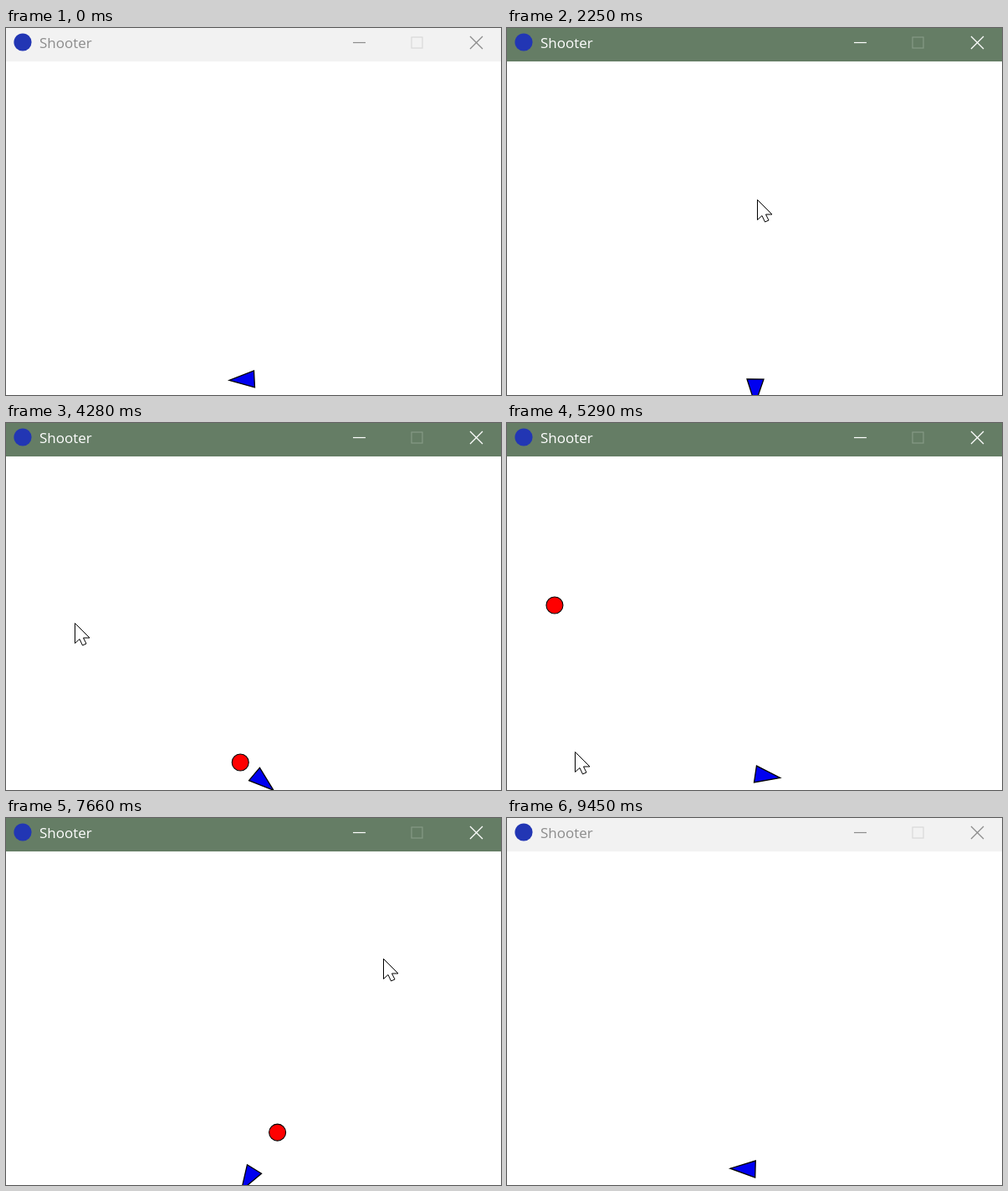
Animation, 592 px wide and 439 px high, one loop 9580 ms. Source, as an HTML page with a canvas:

```html
<!DOCTYPE html>
<html lang="en">
<head>
<meta charset="utf-8">
<title>Shooter</title>
<style>
  html, body { margin: 0; width: 100%; height: 100%; overflow: hidden; background: #fff; }
  canvas { display: block; }
</style>
</head>
<body>
<canvas id="stage" width="592" height="439"></canvas>
<script>
const ctx = document.getElementById('stage').getContext('2d');
const LOOP = 9580, STEP = 68, LAG = 30, SPEED = 0.289, SHOT_DELAY = 40;
const FOCUS_LOST = 9450;
const ship = { x: 297, y: 420 };
const entry = { x: 600, y: 405 };

// The screen refreshes every STEP ms, counted anew from each of these times.
const resyncs = [0, 3080, 4280, 5290, 6700, 7520, 8480, FOCUS_LOST];

// The pointer rests between eased moves; `via` bends a move.
const moves = [
  { start: 0, duration: 640, to: { x: 440, y: 287 } },
  { start: 1100, duration: 390, to: { x: 299, y: 205 } },
  { start: 2360, duration: 1100, to: { x: 82, y: 239 }, via: { x: 150, y: 164 } },
  { start: 4600, duration: 830, to: { x: 81, y: 406 } },
  { start: 6220, duration: 1075, to: { x: 451, y: 168 }, via: { x: 130, y: 166 } },
  { start: 7866, duration: 1000, to: { x: 556, y: 411 }, via: { x: 520, y: 240 } },
  { start: 9380, duration: 30, to: { x: 600, y: 428 } }
];

// Every shot leaves the ship towards the pointer.
const shots = [738, 2320, 4202, 5956, 7476].map(fired => ({ fired, angle: aimAt(fired) }));

const smooth = s => s * s * (3 - 2 * s);

function snap(t) {
  const start = resyncs.filter(time => time <= t).pop();
  return start + Math.floor((t - start) / STEP) * STEP;
}

function pointerAt(t) {
  let from = entry;
  for (const { start, duration, to, via } of moves) {
    if (t < start) break;
    if (t < start + duration) {
      const u = smooth((t - start) / duration);
      const bend = axis => {
        const middle = via ? via[axis] : (from[axis] + to[axis]) / 2;
        return from[axis] * (1 - u) ** 2 + 2 * middle * u * (1 - u) + to[axis] * u * u;
      };
      return { x: bend('x'), y: bend('y') };
    }
    from = to;
  }
  return from;
}

function aimAt(t) {
  const { x, y } = pointerAt(t);
  return Math.atan2(y - ship.y, x - ship.x);
}

function paint(fill, stroke, width) {
  if (fill) { ctx.fillStyle = fill; ctx.fill(); }
  ctx.strokeStyle = stroke;
  ctx.lineWidth = width;
  ctx.stroke();
}

function polygon(points, fill, width) {
  ctx.beginPath();
  points.forEach(([x, y]) => ctx.lineTo(x, y));
  ctx.closePath();
  paint(fill, '#000', width);
}

function disc(x, y, radius) {
  ctx.beginPath();
  ctx.arc(x, y, radius, 0, 2 * Math.PI);
}

function line(x0, y0, x1, y1, color) {
  ctx.beginPath();
  ctx.moveTo(x0, y0);
  ctx.lineTo(x1, y1);
  paint(null, color, 1.2);
}

function drawShip(angle) {
  ctx.save();
  ctx.translate(ship.x, ship.y);
  ctx.rotate(angle);
  polygon([[0, -10], [0, 10], [-30, 0]], '#0000f0', 1.3);
  ctx.restore();
}

function drawShot({ fired, angle }, t) {
  const age = t - fired;
  if (age < SHOT_DELAY) return;
  const distance = age * SPEED;
  disc(ship.x + 0.5 + Math.cos(angle) * distance, ship.y + 0.5 + Math.sin(angle) * distance, 10);
  paint('#f00', '#000', 1.1);
}

function drawTitleBar(focused) {
  const ink = focused ? '#fff' : '#8c8c8c';
  ctx.fillStyle = focused ? '#657d65' : '#f2f2f2';
  ctx.fillRect(0, 0, 592, 40);
  ctx.fillStyle = '#2236b4';
  disc(20, 17, 10.6);
  ctx.fill();
  ctx.fillStyle = ink;
  ctx.font = '17px "Open Sans", "Noto Sans", sans-serif';
  ctx.fillText('Shooter', 40, 24);
  line(415, 17.5, 430, 17.5, ink);
  ctx.strokeStyle = focused ? '#869a86' : '#d9d9d9';
  ctx.strokeRect(485, 11, 13, 13);
  line(555, 10, 570, 25, ink);
  line(570, 10, 555, 25, ink);
}

function drawPointer({ x, y }) {
  ctx.save();
  ctx.translate(Math.round(x) + 0.5, Math.round(y) + 0.5);
  polygon([[0, 0], [0, 24], [5.5, 19], [9, 26.5], [13.5, 24.5], [10, 17.5], [17.5, 17.5]], '#fff', 1);
  ctx.restore();
}

function draw(now) {
  const t = snap(now % LOOP);
  ctx.fillStyle = '#fff';
  ctx.fillRect(0, 0, 592, 439);
  drawShip(aimAt(t - LAG));
  shots.forEach(shot => drawShot(shot, t));
  drawTitleBar(t >= shots[0].fired + SHOT_DELAY && t < FOCUS_LOST);
  drawPointer(pointerAt(t));
  requestAnimationFrame(draw);
}

requestAnimationFrame(draw);
</script>
</body>
</html>
```
